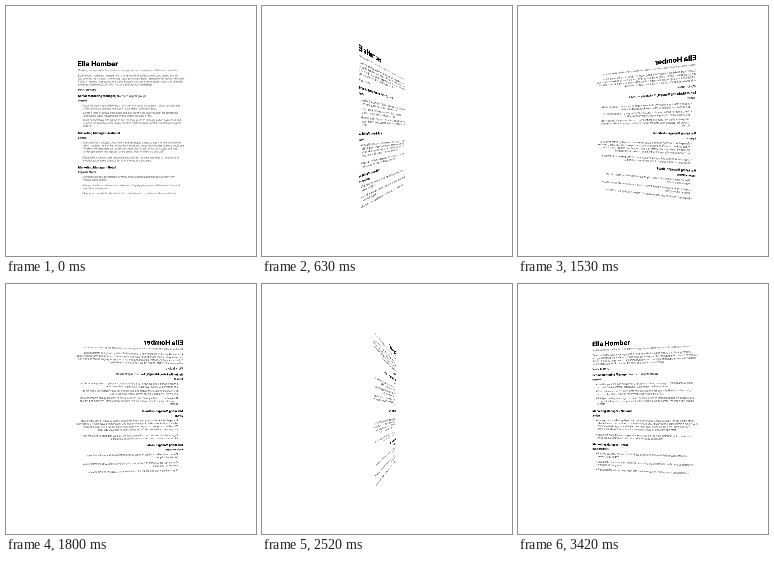
Write an HTML page with a canvas that moves like this. It is 250 px wide and 250 px high and loops after 3510 ms.

```html
<!DOCTYPE html>
<html lang="en">
<head>
<meta charset="utf-8">
<title>Turning page</title>
<style>
html, body { margin: 0; width: 100%; height: 100%; overflow: hidden; background: #fff; }
canvas { display: block; width: 250px; height: 250px; }
</style>
</head>
<body>
<canvas id="stage" width="250" height="250"></canvas>
<script>
const SIZE = 250, MID = SIZE / 2, DETAIL = 4;
const DISTANCE = 240, STEP = 90, STEPS = 39;
const FAMILY = 'Inter, "Open Sans", sans-serif';
const LEFT = 72, INDENT = 75.6;

// The page is typeset once at a higher resolution, then projected per pixel.
function typesetPage() {
  const page = document.createElement('canvas');
  page.width = page.height = SIZE * DETAIL;
  const pen = page.getContext('2d', { willReadFrequently: true });
  pen.scale(DETAIL, DETAIL);
  pen.textBaseline = 'middle';

  function write(text, x, y, size, weight = 400, alpha = 1) {
    pen.font = `${weight} ${size}px ${FAMILY}`;
    pen.globalAlpha = alpha;
    pen.fillText(text, x, y);
    return x + pen.measureText(text).width;
  }
  function lines(x, y, rows) {
    rows.forEach((row, i) => write(row, x, y + i * 2.95, 2.45, 300, 0.85));
  }
  function bullet(y, ...rows) {
    write('•', INDENT, y, 2.2, 300, 0.8);
    lines(INDENT + 1.8, y, rows);
  }
  function heading(y, title, detail, note) {
    const end = write(title, LEFT, y, 2.85, 800);
    write(detail, end + 0.8, y, 2.7, 400);
    write(note, LEFT, y + 4.5, 2.4, 700);
  }

  write('Ella Homber', LEFT - 0.3, 58.2, 6.8, 800);
  write('Marketing manager with a focus on brand strategy, national campaigns and skilled team leadership', LEFT, 64.3, 2.2, 300, 0.75);
  lines(LEFT, 69.8, [
    'Experienced marketing manager with a long record of building strong and lasting brands',
    'and growing the market share through clear planning, careful research and creative new ideas.',
    'Skilled in leading large teams, managing budgets and running campaigns across all channels',
    'with measurable results. Known for calm and practical leadership.'
  ]);
  write('Work history', LEFT, 84.2, 3, 400);

  heading(90.2, 'Senior Marketing Manager,', 'Northern digital groups', 'Present');
  bullet(99.8,
    'Lead the planning and delivery of all major marketing campaigns, raising annual sales',
    'and improving customer retention in each region with new ideas.');
  bullet(107,
    'Direct a team of twelve specialists and oversee the full yearly budget for advertising',
    'and events, while reducing the overall yearly costs by a fifth.');
  bullet(114.2,
    'Build partnerships with agencies and the local press to increase public awareness and',
    'support the launch of new products in five markets, using careful research and regular',
    'reports.');

  heading(127.5, 'Marketing Manager - National', '', '2 years');
  bullet(136.8,
    'Managed the marketing department and developed a new strategy for the online store,',
    'which doubled the number of monthly visitors and improved the sales within a single year.',
    'Worked with designers and writers to create clear materials for print, radio and web,',
    'and prepared monthly reports for the entire board of directors and staff.');
  bullet(151.7,
    'Organised trade fairs and regional events, trained the new members of the team and',
    'introduced a shared calendar for all of the yearly campaigns.');

  heading(161.7, 'Marketing Manager - Retail', '', 'Regional Stores');
  bullet(171,
    'Planned seasonal promotions for thirty shops and followed their results with new',
    'weekly sales figures.');
  bullet(179.6,
    'Created the first customer newsletter and a loyalty programme with several thousand',
    'members in two years.');
  bullet(187.4, 'Supported the whole sales team with market research, displays and presentations.');

  return pen.getImageData(0, 0, page.width, page.height).data;
}

const ink = typesetPage();
const context = document.getElementById('stage').getContext('2d');
const picture = context.createImageData(SIZE, SIZE);
const width = SIZE * DETAIL;

function inkAt(x, y) {
  const px = x * DETAIL - 0.5, py = y * DETAIL - 0.5;
  const col = Math.floor(px), row = Math.floor(py);
  if (col < 0 || row < 0 || col > width - 2 || row > width - 2) return 0;
  const fx = px - col, fy = py - row;
  const i = (row * width + col) * 4 + 3, below = i + width * 4;
  const top = ink[i] * (1 - fx) + ink[i + 4] * fx;
  const bottom = ink[below] * (1 - fx) + ink[below + 4] * fx;
  return top * (1 - fy) + bottom * fy;
}

function draw(angle) {
  const cos = Math.cos(angle), sin = Math.sin(angle);
  picture.data.fill(255);
  for (let x = 0; x < SIZE; x++) {
    const sx = x + 0.5 - MID;
    const u = sx * DISTANCE / (cos * DISTANCE - sx * sin);
    if (Math.abs(u) > 62) continue;
    const depth = 1 + u * sin / DISTANCE;
    for (let y = 0; y < SIZE; y++) {
      const tone = 255 - inkAt(MID + u, MID + (y + 0.5 - MID) * depth);
      picture.data.fill(tone, (y * SIZE + x) * 4, (y * SIZE + x) * 4 + 3);
    }
  }
  context.putImageData(picture, 0, 0);
}

const start = performance.now();
let shown = -1;

function tick() {
  const step = Math.floor((performance.now() - start) / STEP) % STEPS;
  if (step !== shown) {
    shown = step;
    draw(step / STEPS * 2 * Math.PI);
  }
  requestAnimationFrame(tick);
}
tick();
</script>
</body>
</html>
```
